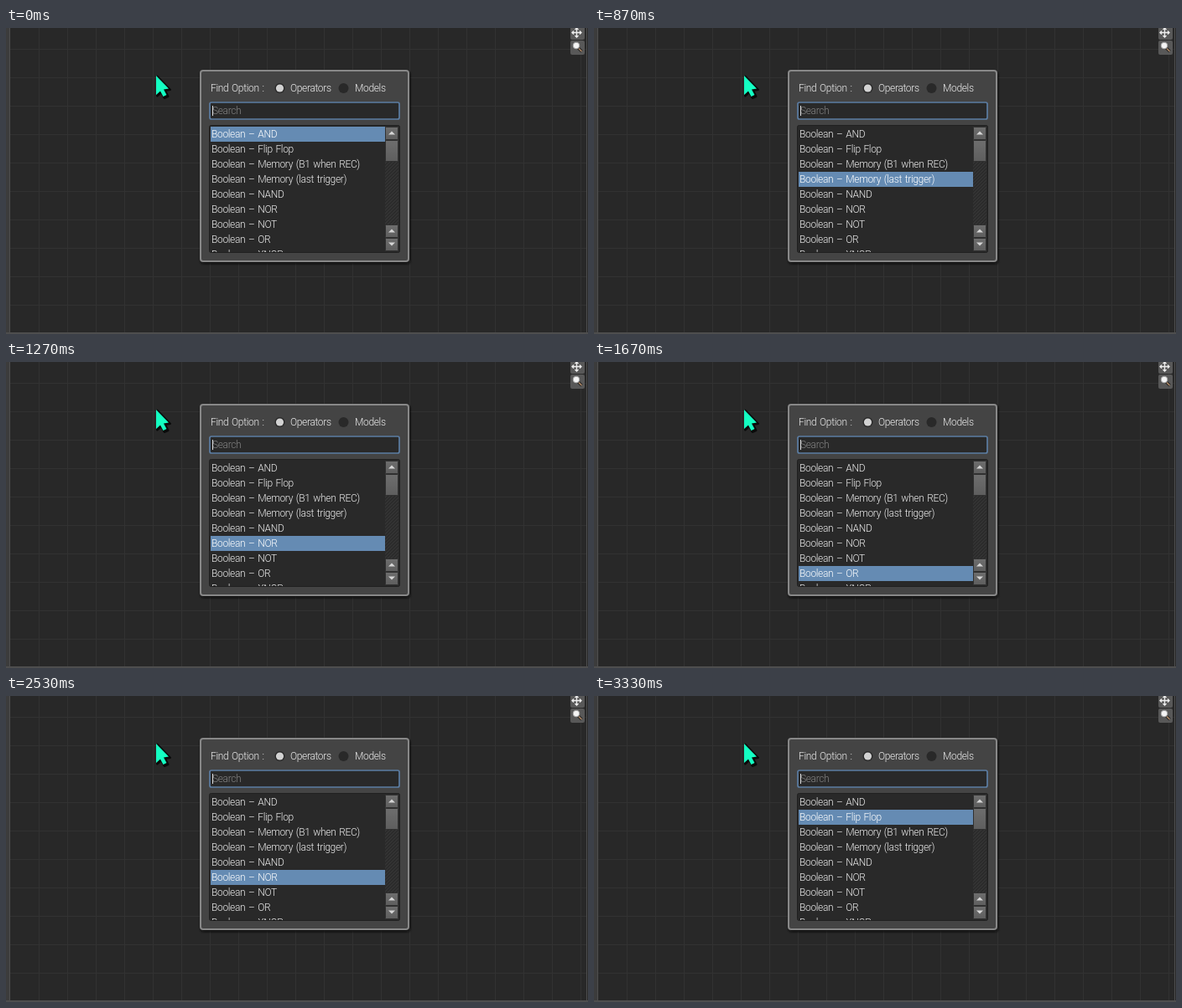
An HTML page for the animation above (3.54 s loop, 694x366 px).

```html
<!DOCTYPE html>
<html lang="en">
<head>
<meta charset="utf-8">
<title>Option finder</title>
<style>
html, body { margin: 0; width: 100%; height: 100%; overflow: hidden; background: #282828; }
svg { display: block; width: 694px; height: 366px; }
text { font: 300 12px Roboto, sans-serif; letter-spacing: -.35px; word-spacing: 1.2px; fill: #eee; white-space: pre; }
text.on { fill: #fff; }
</style>
</head>
<body>
<svg viewBox="0 0 694 366">
  <defs>
    <pattern id="hatch" width="4" height="4" patternUnits="userSpaceOnUse">
      <rect width="4" height="4" fill="#353535"/>
      <path d="M-1 1L1 -1M0 4L4 0M3 5L5 3" stroke="#282828" stroke-width="1.3"/>
    </pattern>
    <linearGradient id="face" x2="0" y2="1">
      <stop stop-color="#6e6e6e"/><stop offset="1" stop-color="#5e5e5e"/>
    </linearGradient>
    <clipPath id="view"><path d="M243 117H469V268H243Z"/></clipPath>
    <filter id="soft" x="-20%" y="-20%" width="140%" height="140%"><feGaussianBlur stdDeviation="1.5"/></filter>
  </defs>

  <path id="grid" stroke="#323232" fill="none"/>
  <path d="M0 0H4V364H0Z" fill="#3c3c3c"/>
  <path d="M4.5 0V364M692.5 0V364" stroke="#4e4e4e" fill="none"/>
  <path d="M0 364H694V366H0Z" fill="#4e4e4e"/>

  <!-- view tools -->
  <g fill="#585858">
    <rect x="673" y="-4" width="17" height="18" rx="2"/>
    <rect x="673" y="15" width="17" height="17" rx="2"/>
  </g>
  <path d="M675 5.5H686M680.5 0V11M678.5 2L680.5 0L682.5 2M678.5 9L680.5 11L682.5 9M677 3.5L675 5.5L677 7.5M684 3.5L686 5.5L684 7.5" stroke="#eee" stroke-width="1.3" fill="none"/>
  <path d="M682 23.5L686.5 28" stroke="#222" stroke-width="3.4"/>
  <path d="M683 24.5L686.5 28" stroke="#b08a68" stroke-width="1.6"/>
  <circle cx="680" cy="21" r="3.8" fill="#f4f4f4" stroke="#aaa"/>

  <!-- dialog -->
  <rect x="232" y="52" width="250" height="230" rx="4" fill="#111" filter="url(#soft)"/>
  <rect x="232" y="51" width="248" height="228" rx="3" fill="#444" stroke="#888" stroke-width="2"/>
  <text x="244" y="76">Find Option :</text>
  <circle cx="326.5" cy="72" r="6" fill="#292929"/>
  <circle cx="326.5" cy="72" r="4.6" fill="#d2d2d2"/>
  <text x="339" y="76">Operators</text>
  <circle cx="402.5" cy="72" r="6" fill="#292929"/>
  <text x="416" y="76">Models</text>

  <rect x="243" y="89" width="226" height="20" rx="2" fill="#292929" stroke="#5b7da3" stroke-width="1.7"/>
  <text x="246" y="103" style="fill:#858585">Search</text>
  <path d="M246.5 93V105" stroke="#ddd"/>

  <rect x="242.5" y="116.5" width="227" height="152" rx="2" fill="#292929" stroke="#202020"/>
  <g id="list" clip-path="url(#view)">
    <rect id="bar" x="244" width="208" height="18" fill="#658bb3"/>
  </g>
  <rect x="452" y="118" width="16" height="149" fill="url(#hatch)"/>
  <g fill="url(#face)" stroke="#303030">
    <rect x="452.5" y="118.5" width="15" height="15" rx="1"/>
    <rect x="452.5" y="134.5" width="15" height="25" rx="1"/>
    <rect x="452.5" y="235.5" width="15" height="15" rx="1"/>
    <rect x="452.5" y="251.5" width="15" height="15" rx="1"/>
  </g>
  <path d="M456 127.5L460 123.5L464 127.5ZM456 244.5L460 240.5L464 244.5ZM456 256.5L460 260.5L464 256.5Z" fill="#d6d6d6"/>

  <!-- pointer -->
  <path d="M179 57V80.5L184 76L187.5 83L192 81L188.5 74L194.5 73Z" fill="#0a0a0a" stroke="#0a0a0a" stroke-width="2.4" stroke-linejoin="round" transform="translate(1.3 .8)"/>
  <path d="M179 57V80L184 75.5L187.5 82L191.5 80L188 73.5L194 72.5Z" fill="#14ffc2"/>
</svg>
<script>
const $ = id => document.getElementById(id);
const LOOP = 3540, ROW = 18, TOP = 118, CELL = 34;
const names = ["AND", "Flip Flop", "Memory (B1 when REC)", "Memory (last trigger)",
  "NAND", "NOR", "NOT", "OR", "XNOR"];
// The selection walks down the list, then back up.
const down = [270, 600, 870, 1070, 1270, 1530, 1670];
const up = [2330, 2530, 2730, 2930, 3200, 3330];

let d = "";
for (let x = 39.5; x < 692; x += CELL) d += `M${x} 0V364`;
for (let y = 25.5; y < 364; y += CELL) d += `M5 ${y}H692`;
$("grid").setAttribute("d", d);

const rows = names.map((name, i) => {
  const row = document.createElementNS("http://www.w3.org/2000/svg", "text");
  row.setAttribute("x", 245);
  row.setAttribute("y", TOP + 13 + i * ROW);
  row.textContent = "Boolean – " + name;
  return $("list").appendChild(row);
});

function draw(now) {
  const t = now % LOOP;
  const passed = times => times.filter(s => t >= s).length;
  const selected = passed(down) - passed(up);
  $("bar").setAttribute("y", TOP + selected * ROW);
  rows.forEach((row, i) => row.classList.toggle("on", i === selected));
}

const start = performance.now();
function tick() {
  draw(performance.now() - start);
  requestAnimationFrame(tick);
}
tick();
</script>
</body>
</html>
```
